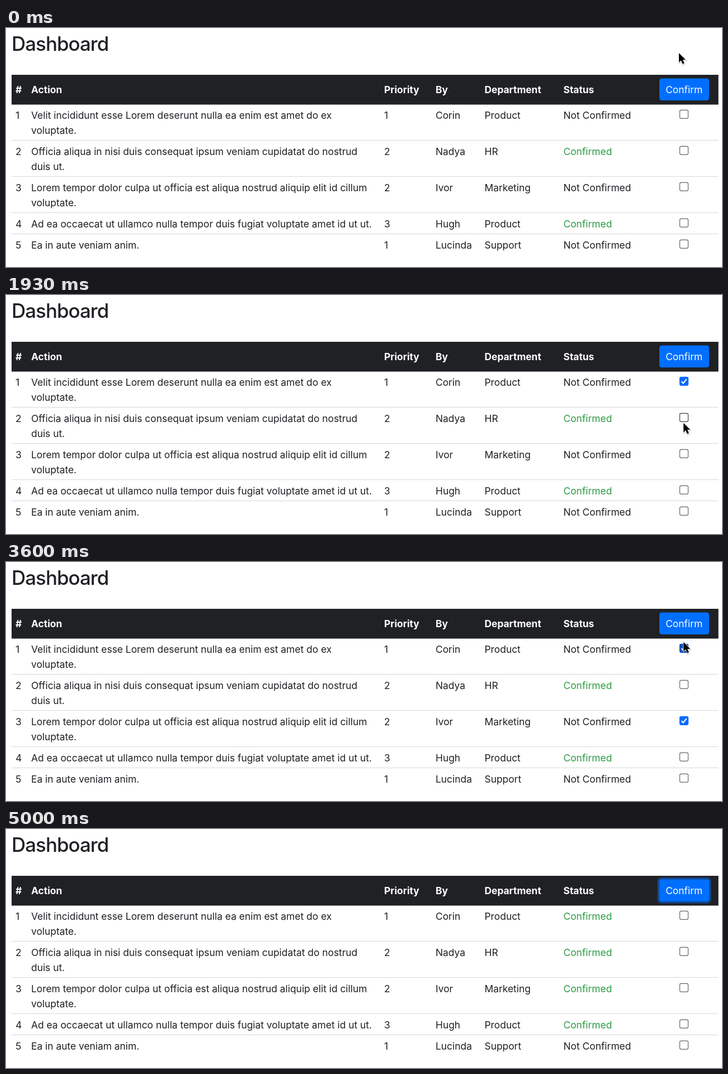
An HTML page for the animation above (5070 ms loop, 1280 by 429 pixels).

```html
<!DOCTYPE html>
<html lang="en">
<head>
<meta charset="utf-8">
<title>Dashboard</title>
<style>
  html, body { margin: 0; width: 100%; height: 100%; overflow: hidden; background: #fff; }
  svg { display: block; width: 100vw; height: 100vh; }
  text { font: 400 17.4px Inter, "Open Sans", sans-serif; letter-spacing: -.01px; fill: #1e2024; white-space: pre; }
  .title { font-size: 34.8px; font-weight: 500; letter-spacing: -.9px; }
  .head { font-weight: 700; fill: #fff; }
  .button { fill: #fff; text-anchor: middle; }
</style>
</head>
<body>
<svg id="stage" viewBox="0 0 1280 429"></svg>
<script>
const LOOP = 5070, STEP = 200 / 3;
const CHECK_FIRST = 1250, CHECK_THIRD = 2700, SUBMIT = 4190;
const COLS = [17, 45, 676, 768, 855.5, 996.5];
const HEADS = ["#", "Action", "Priority", "By", "Department", "Status"];
const ROWS = [
  { y: 163, action: ["Velit incididunt esse Lorem deserunt nulla ea enim est amet do ex", "voluptate."],
    priority: 1, by: "Corin", team: "Product", done: false, checkAt: CHECK_FIRST },
  { y: 228, action: ["Officia aliqua in nisi duis consequat ipsum veniam cupidatat do nostrud", "duis ut."],
    priority: 2, by: "Nadya", team: "HR", done: true },
  { y: 293, action: ["Lorem tempor dolor culpa ut officia est aliqua nostrud aliquip elit id cillum", "voluptate."],
    priority: 2, by: "Ivor", team: "Marketing", done: false, checkAt: CHECK_THIRD },
  { y: 358, action: ["Ad ea occaecat ut ullamco nulla tempor duis fugiat voluptate amet id ut ut."],
    priority: 3, by: "Hugh", team: "Product", done: true },
  { y: 396, action: ["Ea in aute veniam anim."],
    priority: 1, by: "Lucinda", team: "Support", done: false }
];
// Pointer stops: time, x, y
const PATH = [
  [0, 1203, 45], [130, 1203, 45], [730, 1210, 149], [1550, 1210, 149],
  [2110, 1212, 284], [3250, 1212, 284], [3765, 1211, 99], [4100, 1220, 99],
  [4470, 1220, 99], [4870, 1226, 440]
];

const stage = document.getElementById("stage");

function add(tag, attrs, parent = stage) {
  const el = document.createElementNS("http://www.w3.org/2000/svg", tag);
  for (const key in attrs) el.setAttribute(key, attrs[key]);
  parent.appendChild(el);
  return el;
}

function label(x, y, value, cls = "") {
  const el = add("text", { x, y, class: cls });
  el.textContent = value;
  return el;
}

function show(el, on) {
  el.setAttribute("visibility", on ? "visible" : "hidden");
}

label(10, 41, "Dashboard", "title");
add("rect", { x: 10, y: 84, width: 1263.6, height: 53.5, fill: "#202125" });
HEADS.forEach((name, i) => label(COLS[i], 117, name, "head"));

const ring = add("rect", { x: 1164.5, y: 87, width: 96, height: 46.5, rx: 7, fill: "#13468d" });
const button = add("rect", { x: 1168, y: 90.5, width: 89, height: 39.5, rx: 4.5 });
label(1212.2, 117, "Confirm", "button");

ROWS.forEach((row, i) => {
  if (i) add("rect", { x: 10, y: row.y - 27, width: 1263.6, height: 1, fill: "#d5d8db" });
  label(COLS[0], row.y, i + 1);
  row.action.forEach((line, n) => label(COLS[1], row.y + n * 27, line));
  [row.priority, row.by, row.team].forEach((value, n) => label(COLS[n + 2], row.y, value));
  row.status = label(COLS[5], row.y, "");
  row.box = add("rect", { x: 1204.5, y: row.y - 15.7, width: 15, height: 15, rx: 2.5, "stroke-width": 1.2 });
  row.tick = add("path", {
    d: `M1207.5 ${row.y - 7.8}l3.2 3.3 5.8-7.4`,
    fill: "none", stroke: "#fff", "stroke-width": 2.1
  });
});

const pointer = add("g", {});
const arrow = add("g", {}, pointer);
const arrowShape = "M0 0V16.8L3.9 13.2 6.6 19.6 9.6 18.3 6.9 12.1H12Z";
add("path", { d: arrowShape, transform: "translate(.5 1.5)", fill: "none", stroke: "#000", "stroke-opacity": .13, "stroke-width": 3.5, "stroke-linejoin": "round" }, arrow);
add("path", { d: arrowShape, fill: "#000", stroke: "#fff", "stroke-width": 1.5, "paint-order": "stroke", "stroke-linejoin": "round" }, arrow);

const hand = add("g", { stroke: "#000", "stroke-width": 1.2, "stroke-linejoin": "round", "stroke-linecap": "round" }, pointer);
add("path", {
  d: "M-1 1C-2-1 1-2 2 .3L4.5 6.3C4.5 4.7 7 4.6 7.6 6.2 8.3 5 10.3 5.4 10.7 7 11.8 6.3 13.3 7 13.5 8.8 13.9 12 13.4 14 12 16.2V19H3.5C2.8 16-1 13.5-2.5 10.7-3.2 9 -.8 8.2 .4 9.6L1.9 11Z",
  fill: "#fff"
}, hand);
add("path", { d: "M5.3 11.5V15.5M7.9 11.5V15.5M10.4 11.5V15.5", fill: "none", "stroke-width": 1 }, hand);

function ease(u) {
  return u * u * (3 - 2 * u);
}

function pointerAt(t) {
  const next = PATH.findIndex(stop => stop[0] > t);
  if (next < 0) return PATH[PATH.length - 1].slice(1);
  const a = PATH[next - 1], b = PATH[next];
  const u = ease((t - a[0]) / (b[0] - a[0]));
  return [a[1] + (b[1] - a[1]) * u, a[2] + (b[2] - a[2]) * u];
}

function draw(t) {
  const [x, y] = pointerAt(t);
  const sent = t >= SUBMIT;
  const overButton = y > 89 && y < 130 && x > 1168 && x < 1257;

  ROWS.forEach(row => {
    const done = row.done || (sent && row.checkAt);
    const checked = !sent && t >= row.checkAt;
    const hover = Math.abs(y - row.y + 8) < 12;
    row.status.textContent = done ? "Confirmed" : "Not Confirmed";
    row.status.style.fill = done ? "#2c9b43" : "";
    const blue = hover ? "#0b50bd" : "#0a6bff";
    row.box.setAttribute("fill", checked ? blue : "#fff");
    row.box.setAttribute("stroke", checked ? blue : hover ? "#444" : "#666");
    show(row.tick, checked);
  });

  show(ring, sent);
  button.setAttribute("fill", overButton ? "#005cd8" : "#006fff");
  pointer.setAttribute("transform", `translate(${x.toFixed(2)} ${y.toFixed(2)})`);
  show(arrow, !overButton);
  show(hand, overButton);
}

function frame(now) {
  const t = now % LOOP;
  draw(Math.floor((t + 1) / STEP) * STEP);
  requestAnimationFrame(frame);
}

draw(0);
requestAnimationFrame(frame);
</script>
</body>
</html>
```
